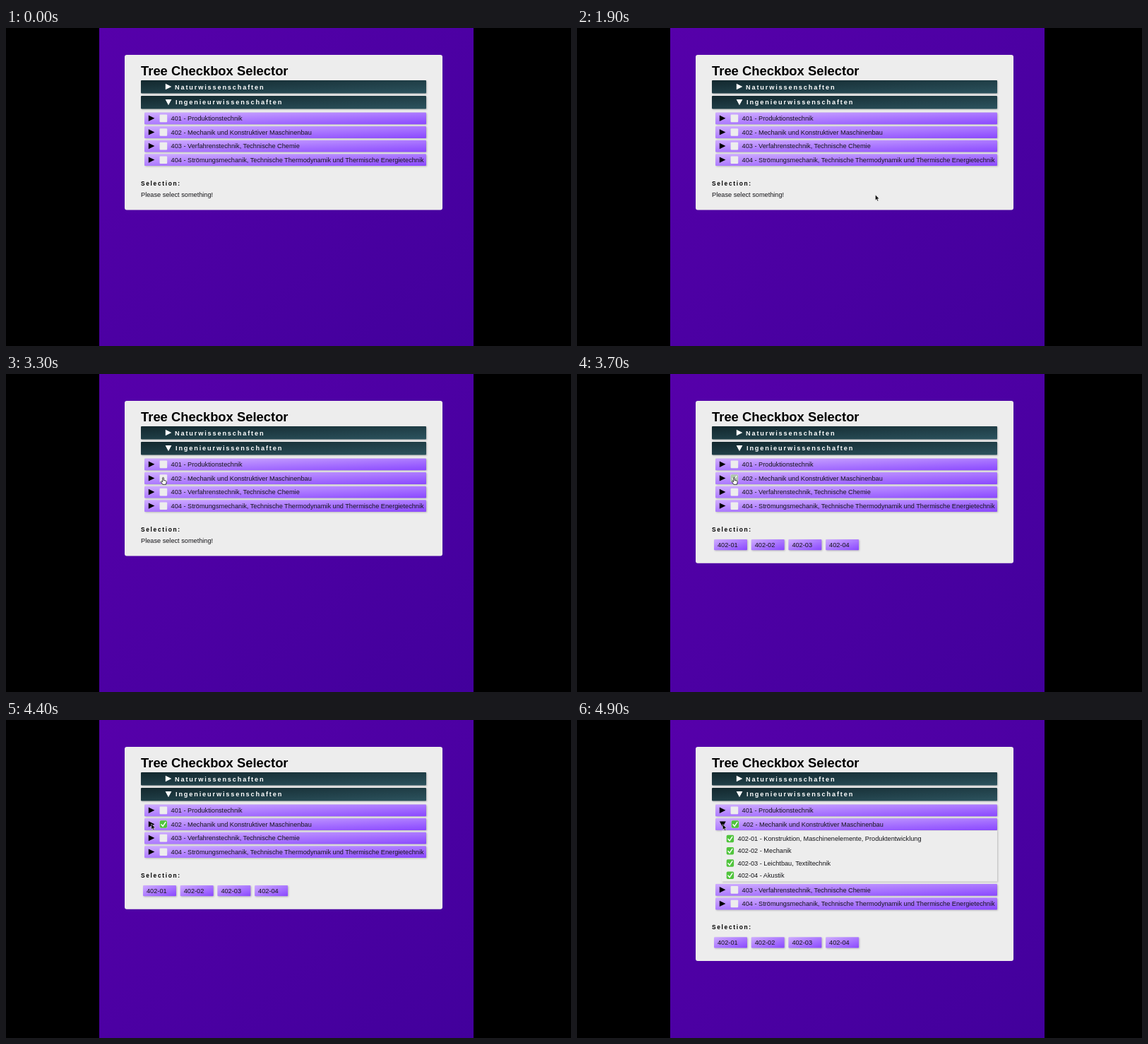
An HTML page for the animation above (5000 ms loop, 800 by 450 pixels).

```html
<!DOCTYPE html>
<html lang="de">
<head>
<meta charset="utf-8">
<title>Tree Checkbox Selector</title>
<style>
  html, body { margin: 0; width: 100%; height: 100%; overflow: hidden; background: #000; }
  svg { display: block; width: 800px; height: 450px; }
  text { font: 9.2px "Liberation Sans", Arial, sans-serif; fill: #141418; }
  .title { font-size: 18.4px; font-weight: bold; fill: #000; }
  .head { font-weight: bold; letter-spacing: .2em; fill: #fff; }
  .label { font-size: 8.4px; font-weight: bold; letter-spacing: .2em; fill: #000; }
  .raised { filter: drop-shadow(1px 1px 1.2px rgba(0, 0, 0, .22)); }
</style>
</head>
<body>
<svg viewBox="0 0 800 450">
  <defs>
    <linearGradient id="page" x2="1" y2="1"><stop stop-color="#5600aa"/><stop offset="1" stop-color="#42009c"/></linearGradient>
    <linearGradient id="violet" x2="1" y2="1"><stop stop-color="#cfadff"/><stop offset="1" stop-color="#8a48ff"/></linearGradient>
    <linearGradient id="slate" x2="1" y2="1"><stop stop-color="#13282e"/><stop offset="1" stop-color="#2c535e"/></linearGradient>
    <g id="tick">
      <rect width="10.4" height="10.4" rx="1.8" fill="#50c43c"/>
      <path d="M2.3 5.6L4.4 8L8.2 2.4" fill="none" stroke="#fff" stroke-width="1.5" stroke-linecap="round"/>
    </g>
  </defs>
  <rect x="132" width="530" height="450" fill="url(#page)"/>
  <rect id="panel" x="168" y="38" width="450" height="219.5" rx="3" fill="#ededed"/>
  <text class="title" x="191" y="67">Tree Checkbox Selector</text>
  <g id="heads"></g>
  <g id="rows"></g>
  <g id="children"></g>
  <g id="summary">
    <text class="label" x="191" y="223">Selection:</text>
    <text id="empty" x="191" y="239.3">Please select something!</text>
    <g id="chips"></g>
  </g>
  <g id="cursor" stroke-linejoin="round">
    <path id="pointer" d="M0 0V7.8L1.8 6.2L3 9L4.3 8.4L3.1 5.7H5.5Z" fill="#000" stroke="#fff" stroke-width=".5"/>
    <path id="hand" d="M-.8 .3Q0-.6 .8 .3V4L3.8 4.6Q4.9 5 4.7 6.2L4 9.8H-.7L-3 6.2Q-3.2 5-2 5.2L-.8 6.3Z" fill="#fff" stroke="#111" stroke-width=".8"/>
  </g>
</svg>
<script>
const $ = id => document.getElementById(id);
const show = (id, on) => $(id).style.display = on ? '' : 'none';
const move = (id, x, y) => $(id).setAttribute('transform', `translate(${x} ${y})`);
const right = (x, y, fill) => `<path class="right" d="M${x - 4} ${y - 4.2}L${x + 4.6} ${y}L${x - 4} ${y + 4.2}Z" fill="${fill}"/>`;
const down = (x, y, fill) => `<path class="down" d="M${x - 4.4} ${y - 4}H${x + 4.4}L${x} ${y + 4.2}Z" fill="${fill}"/>`;
const bar = (x, y, w, h, fill) => `<rect class="raised" x="${x}" y="${y}" width="${w}" height="${h}" rx="1" fill="url(#${fill})"/>`;
const tick = (x, y) => `<use href="#tick" x="${x}" y="${y}"/>`;
const text = (x, y, s, cls = '') => `<text class="${cls}" x="${x}" y="${y}">${s}</text>`;

$('heads').innerHTML =
  bar(191, 74, 404, 18.5, 'slate') + right(229.8, 83, '#fff') + text(239, 86.6, 'Naturwissenschaften', 'head') +
  bar(191, 96, 404, 18.5, 'slate') + down(230, 105, '#fff') + text(240, 108.4, 'Ingenieurwissenschaften', 'head');

const topics = [
  '401 - Produktionstechnik',
  '402 - Mechanik und Konstruktiver Maschinenbau',
  '403 - Verfahrenstechnik, Technische Chemie',
  '404 - Strömungsmechanik, Technische Thermodynamik und Thermische Energietechnik'
];
$('rows').innerHTML = topics.map((s, i) => `<g id="row${i}">` +
  bar(196, 119.5, 399, 16.8, 'violet') + right(205.8, 127.8, '#000') +
  (i === 1 ? down(206.3, 127.8, '#000') : '') +
  `<g class="item"><rect x="217.6" y="122.6" width="10.6" height="10.6" rx="1" fill="#ededed"/>` +
  (i === 1 ? `<g id="check">${tick(217.7, 122.7)}</g>` : '') +
  text(233.6, 131, s) + '</g></g>').join('');

const parts = ['Konstruktion, Maschinenelemente, Produktentwicklung', 'Mechanik', 'Leichtbau, Textiltechnik', 'Akustik'];
$('children').innerHTML = '<rect class="raised" x="205" y="156.5" width="390" height="72" fill="#ededed"/>' +
  parts.map((s, i) => tick(211.7, 162.8 + i * 17.25) + text(227.6, 171 + i * 17.25, `402-0${i + 1} - ${s}`)).join('');
$('chips').innerHTML = parts.map((s, i) =>
  bar(194 + i * 52.7, 234, 47, 15.2, 'violet') + text(199 + i * 52.7, 244.7, `402-0${i + 1}`)).join('');

const arrowRight = document.querySelector('#row1 .right');
const arrowDown = document.querySelector('#row1 .down');
const item = document.querySelector('#row1 .item');

// time, x, y of the pointer
const path = [[1300, 472.5, 245], [1400, 472, 258], [1700, 472, 258], [2400, 222, 147], [3100, 222, 147],
  [3300, 222.5, 146.5], [3900, 222.5, 146.5], [4400, 205.8, 147], [4600, 206, 147], [4800, 206.3, 147.5], [5000, 206.3, 147.5]];
function pointerAt(t) {
  const i = Math.max(1, path.findIndex(p => p[0] > t));
  const [a, b] = [path[i - 1], path[i]];
  const u = Math.min(1, Math.max(0, (t - a[0]) / (b[0] - a[0])));
  const e = u * u * (3 - 2 * u);
  return [a[1] + (b[1] - a[1]) * e, a[2] + (b[2] - a[2]) * e];
}

function draw(now) {
  const t = Math.floor(now % 5000 / 100) * 100;
  const selected = t >= 3700, open = t >= 4500;
  const shift = open ? 73.3 : 0;
  topics.forEach((s, i) => move('row' + i, 0, i * 19.6 + (i > 1 ? shift : 0)));
  move('summary', 0, shift);
  $('panel').setAttribute('height', (selected ? 229.7 : 219.5) + shift);
  show('empty', !selected);
  show('chips', selected);
  show('children', open);
  arrowRight.style.display = open ? 'none' : '';
  arrowDown.style.display = open ? '' : 'none';
  item.setAttribute('transform', `translate(${open ? 1 : 0} 0)`);

  const fade = Math.min(1, Math.max(0, (t - 3700) / 300));
  $('check').style.opacity = selected ? .6 + .4 * fade : 0;
  $('check').style.filter = fade < 1 ? `grayscale(${.65 * (1 - fade)})` : 'none';

  const [x, y] = pointerAt(t);
  const hand = t >= 3200 && x > 217;
  show('cursor', t >= 1300);
  show('hand', hand);
  show('pointer', !hand);
  move('cursor', x, y);
  requestAnimationFrame(tickFrame);
}
const start = performance.now();
const tickFrame = now => draw(Math.max(0, now - start));
draw(0);
</script>
</body>
</html>
```
